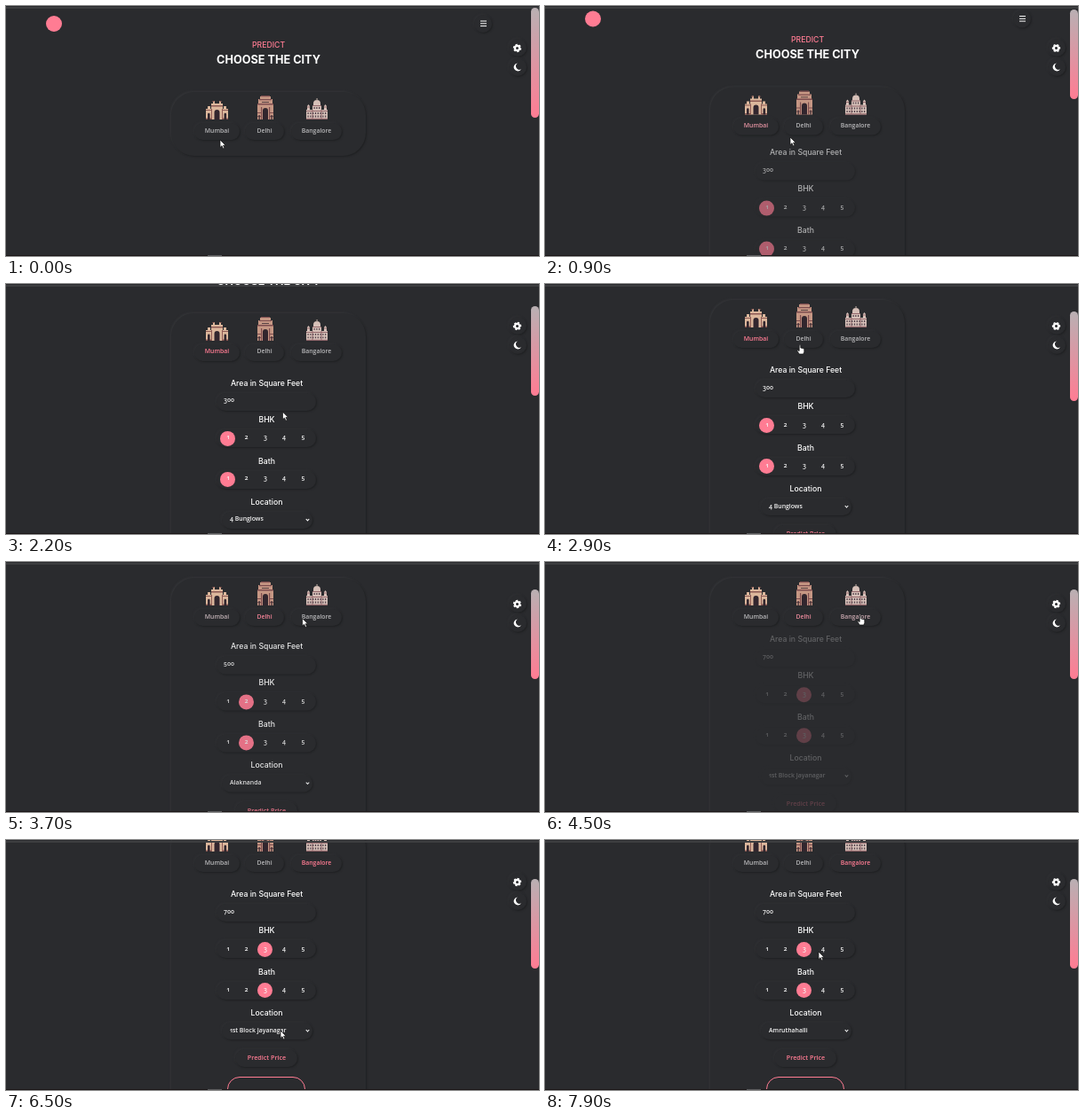
Animation of 600 by 282 pixels, one loop 8000 ms. Source, as an HTML page:

```html
<!DOCTYPE html>
<html lang="en">
<head>
<meta charset="utf-8">
<title>Choose the city</title>
<style>
:root { --bg: #2a2b2e; --pink: #ff7c93; --up: 1px 1px 2px #1f2022, -1px -1px 2px #303134; }
html, body { margin: 0; width: 100%; height: 100%; overflow: hidden; background: var(--bg); }
#stage { position: relative; width: 600px; height: 282px; overflow: hidden; background: var(--bg);
  font: 600 6.9px "Open Sans", "Noto Sans", sans-serif; font-variant-numeric: oldstyle-nums; color: #f4f4f4; }
#stage div, #stage svg { position: absolute; }
#page, #form { left: 0; top: 0; width: 600px; height: 0; }
.text { white-space: nowrap; line-height: 1; transform: translate(-50%, -50%); }
.left { transform: translate(0, -50%); }
.title { font: 500 8.7px/1 Inter, "Open Sans", sans-serif; color: #fff; }
.pill { border-radius: 20px; box-shadow: var(--up); }
#card { left: 186px; top: 97px; width: 219px; border-radius: 26px; background: var(--bg);
  box-shadow: 1px 1px 2px #1f2022, -1px -1px 2px #353639; }
.dot { width: 17px; height: 17px; margin: -8.5px -9px; border-radius: 50%; background: var(--pink); }
#result { left: 249px; top: 382px; width: 86px; height: 60px; border: 1.2px solid var(--pink); border-radius: 14px; }
#thumb { left: 591px; width: 9px; border-radius: 5px; background: linear-gradient(#b9b0b3, #ff7c93); }
#list { left: 244px; top: 23px; width: 101px; height: 182px; background: var(--bg); outline: .5px solid #777; font-size: 6.2px; }
#list div { left: 0; width: 93px; height: 9.1px; padding-left: 8px; line-height: 9.1px; white-space: nowrap; }
</style>
</head>
<body>
<div id="stage">
  <div id="page">
    <div style="left:45px;top:11px;width:18px;height:18px;border-radius:50%;background:var(--pink)"></div>
    <div class="pill" style="left:527px;top:10px;width:20px;height:20px"></div>
    <svg style="left:533.500px;top:16px" width="8" height="8"><path d="M0 1h7M0 3.800h7M0 6.600h7" stroke="#fff" stroke-width="1"/></svg>
    <div id="card"></div>
    <svg style="left:224px;top:98px" width="142" height="32">
      <g id="west">
        <path fill="#dcb79c" d="M1 30V18h2v-3h3v3h1v-6h2v-3h2v3h5v-3h2v3h2v6h1v-3h3v3h2v12z"/>
        <path fill="#8d5a54" d="M1 19h6v1H1zM20 19h6v1h-6zM7 14h13v1.500H7zM8.500 9h2v1.200h-2zM16.500 9h2v1.200h-2zM7 18h1v12H7zM19 18h1v12h-1zM1 28.500h6V30H1zM20 28.500h6V30h-6z"/>
        <path fill="#32262e" d="M10.500 30v-8a3 3 0 0 1 6 0v8zM3 30v-6a1.300 1.300 0 0 1 2.600 0v6zM21.500 30v-6a1.300 1.300 0 0 1 2.600 0v6z"/>
      </g>
      <g id="north">
        <path fill="#c69784" d="M59 30V13h1V7h2V4h12v3h2v6h1v17z"/>
        <path fill="#7d4d4f" d="M59 12h18v1.500H59zM61 7h14v1.200H61zM63 3h10v1.200H63zM59 22h4v1h-4zM73 22h4v1h-4zM59 26h4v1h-4zM73 26h4v1h-4zM63 16h1.200v14H63zM72 16h1.200v14H72z"/>
        <path fill="#32262e" d="M65 30V20a3 3 0 0 1 6 0v10zM60.500 30v-5h1.200v5zM74.500 30v-5h1.200v5zM64 10h8v.8h-8z"/>
      </g>
      <g id="south">
        <path fill="#d6c0b8" d="M114 30V19h1v-4l1.500-2 1.500 2v4h3v-5h1v-2a4 4 0 0 1 8 0v2h1v5h3v-4l1.500-2 1.500 2v4h1v11zM125.600 6h.9v4h-.9z"/>
        <path fill="#93686c" d="M114 20h24v1h-24zM121 14h10v1h-10zM115 15.500h3v1h-3zM134 15.500h3v1h-3zM114 28.800h24V30h-24zM120.500 19h1v11h-1zM130.500 19h1v11h-1z"/>
        <path stroke="#4b3b45" stroke-width="1.800" stroke-dasharray="1.200 1.600" d="M115.500 23h22M115.500 26.500h22M122.500 17h8"/>
      </g>
    </svg>
    <div id="form"><div id="result"></div></div>
  </div>
  <div style="left:0;top:.5px;width:600px;height:2px;background:#3d3e40"></div>
  <div style="left:0;top:280.500px;width:600px;height:2px;background:#1c1718"></div>
  <div style="left:227px;top:280.500px;width:16px;height:2px;background:#5a5a5c"></div>
  <div class="pill" style="left:566px;top:37px;width:20px;height:20px"></div>
  <div class="pill" style="left:566px;top:59px;width:20px;height:20px"></div>
  <svg style="left:569px;top:40.500px" width="13" height="40" fill="none">
    <g id="gear" stroke="#fff">
      <circle cx="6.500" cy="6.500" r="2.600" stroke-width="2.200"/>
      <circle cx="6.500" cy="6.500" r="4" stroke-width="1.400" pathLength="12" stroke-dasharray="1.100 .9"/>
    </g>
    <path fill="#fff" d="M6.800 23.500A4.500 4.500 0 1 0 11 30.300A4 4 0 0 1 6.800 23.500z"/>
  </svg>
  <div id="thumb"></div>
  <div id="list"></div>
  <svg id="arrow" width="10" height="12" viewBox="-1 -1 10 12"><path d="M0 0v8.500l2-1.800 1.500 3.200 1.500-.7-1.500-3h2.700z" fill="#fff" stroke="#111" stroke-width=".7"/></svg>
  <svg id="hand" width="10" height="12" viewBox="-4 -1 10 12"><path d="M-.8 0Q0-.8.8 0v3l4 1v3.500L3.800 10H-.8L-3 6.500q0-1.300 2.200 0z" fill="#fff" stroke="#111" stroke-width=".7"/></svg>
</div>
<script>
const $ = id => document.getElementById(id);
const page = $('page'), form = $('form');

function add(parent, cls, x, y, text = '', style = '') {
  const el = document.createElement('div');
  el.className = cls;
  el.style.cssText = `left:${x}px;top:${y}px;${style}`;
  el.textContent = text;
  return parent.appendChild(el);
}
const pill = (parent, x0, x1, y, h) =>
  add(parent, 'pill', x0, y - h / 2, '', `width:${x1 - x0}px;height:${h}px`);

add(page, 'text title', 295.5, 44, 'PREDICT', 'color:var(--pink)');
add(page, 'text title', 295.5, 60.5, 'CHOOSE THE CITY', 'font-size:12.7px;font-weight:700');

const cities = [
  { name: 'Mumbai', x0: 212, x1: 263, area: 300, rooms: 1, place: '4 Bunglows', click: 400 },
  { name: 'Delhi', x0: 269, x1: 313, area: 500, rooms: 2, place: 'Alaknanda', click: 3000 },
  { name: 'Bangalore', x0: 321, x1: 378, area: 700, rooms: 3, place: '1st Block Jayanagar', click: 4300 }
];
for (const c of cities) {
  pill(page, c.x0, c.x1, 141.5, 19);
  c.label = add(page, 'text', (c.x0 + c.x1) / 2, 141, c.name);
}

[['Area in Square Feet', 175.5], ['BHK', 217], ['Bath', 263.5], ['Location', 310]]
  .forEach(([s, y]) => add(form, 'text title', 293.5, y, s));
pill(form, 237, 349, 196.5, 20);
const area = add(form, 'text left', 245, 195.5);
const digitX = [250, 270.5, 292, 313, 334.5];
const dots = [238, 284.5].map(y => {
  pill(form, 237, 349, y, 20);
  const dot = add(form, 'dot', 0, y);
  digitX.forEach((x, i) => add(form, 'text', x, y - .5, i + 1));
  return dot;
});
pill(form, 243, 345, 330.5, 19);
const place = add(form, 'text left', 252, 330);
add(form, '', 337.5, 327.5, '', 'width:2px;height:2px;border:solid #fff;border-width:0 1px 1px 0;transform:rotate(45deg)');
pill(form, 258, 328, 361, 20);
add(form, 'text', 293.5, 361, 'Predict Price', 'color:var(--pink);font-size:7.2px');

const rowH = 9.1, chosen = 15;
const rows = ['1st Block Jayanagar', '1st Phase JP Nagar', '2nd Phase Judicial Layout', '2nd Stage Nagarbhavi',
  '5th Block Hbr Layout', '5th Phase JP Nagar', '6th Phase JP Nagar', '7th Phase JP Nagar', '8th Phase JP Nagar',
  '9th Phase JP Nagar', 'AECS Layout', 'Abbigere', 'Akshaya Nagar', 'Ambalipura', 'Ambedkar Nagar',
  'Amruthahalli', 'Anandapura', 'Ananth Nagar', 'Anekal', 'Anjanapura']
  .map((s, i) => add($('list'), '', 0, i * rowH, s));

const clamp = v => Math.max(0, Math.min(1, v));
const ease = u => u < .5 ? 4 * u ** 3 : 1 - 4 * (1 - u) ** 3;
const ramp = (t, a, b) => ease(clamp((t - a) / (b - a)));

// time, x, y of the pointer tip
const path = [[0, 241, 151], [300, 238, 144], [600, 238, 144], [1200, 314, 152], [2000, 314, 152], [2700, 287, 69],
  [3300, 287, 69], [4000, 355, 61], [4600, 355, 61], [5100, 371, 131], [5600, 371, 131], [6300, 309, 215],
  [6800, 309, 215], [7300, 302, 164], [7600, 302, 164], [7900, 308, 126]];
function pointer(t) {
  const i = Math.max(1, path.findIndex(k => k[0] >= t));
  const [a, b] = [path[i - 1], path[i]], u = ramp(t, a[0], b[0]);
  return [a[1] + (b[1] - a[1]) * u, a[2] + (b[2] - a[2]) * u];
}

function draw(t) {
  const scroll = 59 * ramp(t, 700, 1400) + 20 * ramp(t, 2000, 2500) + 36 * ramp(t, 5100, 5480);
  const open = ramp(t, 400, 800);
  page.style.transform = `translateY(${-scroll}px)`;
  $('card').style.height = 72 + 400 * open + 'px';
  $('thumb').style.top = 2 + scroll * .362 + 'px';
  $('thumb').style.height = 124 - 23 * open + 'px';

  const now = cities.findLastIndex(c => t >= c.click);
  const shown = now < 0 ? 0 : clamp((t - cities[now].click) / 800);
  form.style.opacity = shown;
  form.style.transform = `translateY(${-13 * (1 - shown)}px)`;
  cities.forEach((c, i) => {
    const on = i === now ? shown : i === now - 1 ? 1 - shown : 0;
    c.label.style.color = `rgb(${184 + 71 * on},${184 - 60 * on},${186 - 39 * on})`;
  });
  if (now >= 0) {
    const c = cities[now];
    area.textContent = c.area;
    place.textContent = t >= 7600 ? rows[chosen].textContent : c.place;
    dots.forEach(d => d.style.left = digitX[c.rooms - 1] + 'px');
  }

  const [x, y] = pointer(t);
  const listed = t >= 6700 && t < 7600;
  const over = y < 205 ? Math.floor((y - 23) / rowH) : 0;
  $('list').style.display = listed ? '' : 'none';
  rows.forEach((r, i) => r.style.background = i === over ? '#1e6fd0' : '');

  const hand = t >= 200 && t < 700 || t >= 2600 && t < 3500 || t >= 3900 && t < 4700;
  $('arrow').style.display = hand ? 'none' : '';
  $('hand').style.display = hand ? '' : 'none';
  $('arrow').style.transform = `translate(${x - 1}px,${y - 1}px)`;
  $('hand').style.transform = `translate(${x - 4}px,${y - 1}px)`;
  $('gear').setAttribute('transform', `rotate(${t * .18} 6.5 6.5)`);
}

const start = performance.now();
function tick() {
  draw(Math.floor((performance.now() - start) % 8000 / 100) * 100);
  requestAnimationFrame(tick);
}
tick();
</script>
</body>
</html>
```
